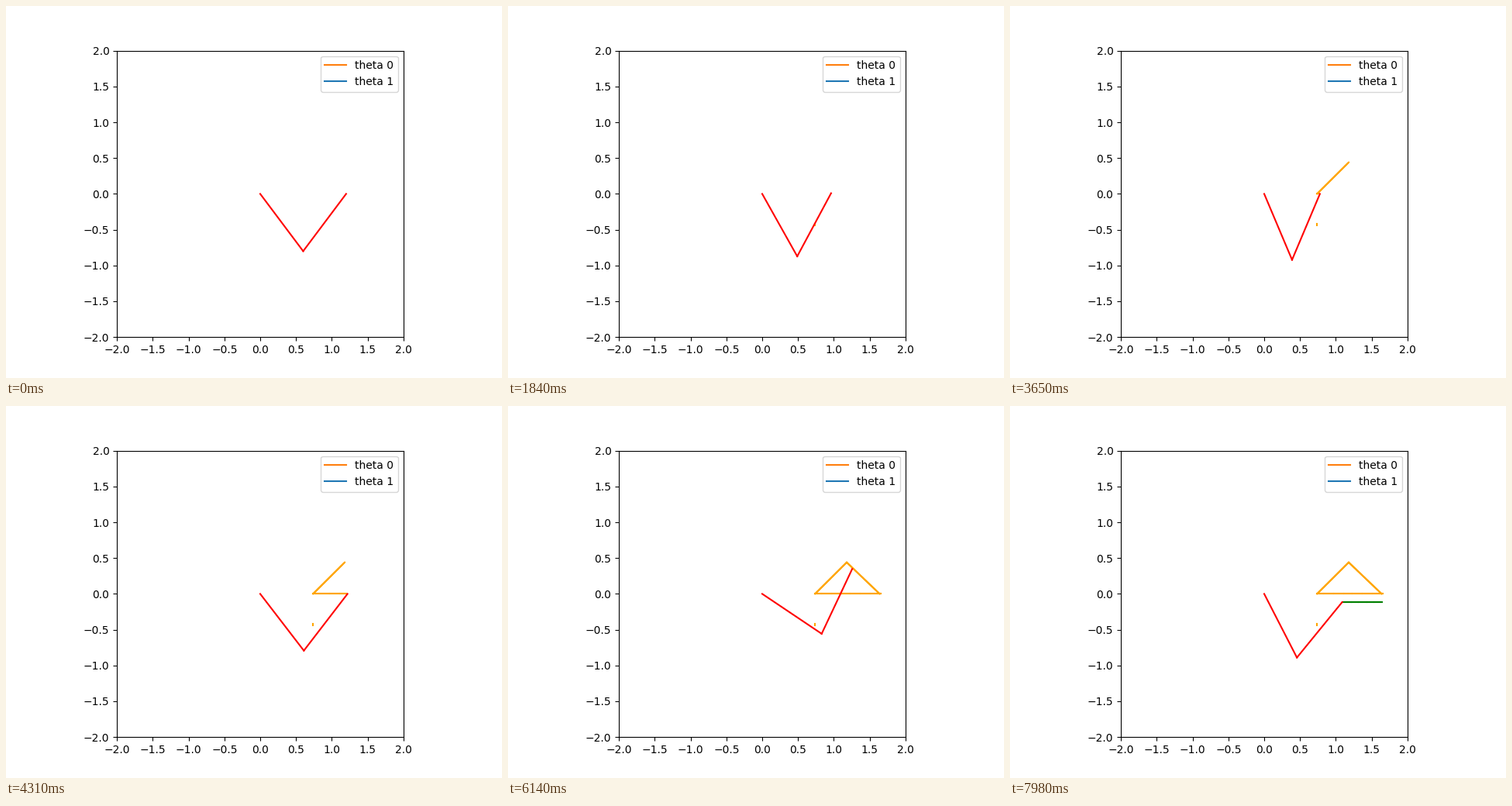
A matplotlib script that plays this animation: 640 px wide and 480 px high, repeating every 8 s.

```python
import numpy as np
import matplotlib.pyplot as plt
from matplotlib.animation import FuncAnimation
from matplotlib.collections import LineCollection

LOOP, INTERVAL, STEP = 8000, 20, 30
START = (1.2, 0.0)
APEX, LEFT, RIGHT = (1.18, 0.44), (0.738, 0.0), (1.64, 0.0)

# target, number of steps, pen colour (None = lifted), pause at the end in ms
LEGS = [
    ((0.735, -0.44), 32, None, 30),
    (APEX, 49, None, 100),
    (LEFT, 31, "orange", 0),
    ((1.66, 0.0), 46, "orange", 0),
    (RIGHT, 1, "orange", 0),
    (APEX, 32, "orange", 0),
    ((1.64, -0.115), 36, None, 100),
    ((0.735, -0.115), 46, "green", 0),
]


def build_path():
    times, points, pens = [0], [START], [None]
    t = 130
    for target, n, pen, pause in LEGS:
        origin = np.array(points[-1])
        for k in range(1, n + 1):
            times.append(t)
            points.append(origin + (np.array(target) - origin) * k / n)
            pens.append(pen)
            t += STEP
        t += pause
    return np.array(times), np.array(points, dtype=float), pens


def elbow(tip):
    """Lower elbow position for two links of length 1."""
    reach = np.hypot(*tip)
    angle = np.arctan2(tip[1], tip[0]) - np.arccos(reach / 2)
    return np.array([np.cos(angle), np.sin(angle)])


TIMES, POINTS, PENS = build_path()
TOUCH_TIME = 1120
TOUCH = [(0.735, -0.44), (0.735, -0.42)]

fig, ax = plt.subplots(figsize=(6.4, 4.8), dpi=100)
ax.set_aspect("equal")
ax.set_xlim(-2, 2)
ax.set_ylim(-2, 2)
ax.plot([], [], color="C1", label="theta 0")
ax.plot([], [], color="C0", label="theta 1")
ax.legend(loc="upper right")

trail = LineCollection([], linewidths=1.5, capstyle="projecting", zorder=2)
ax.add_collection(trail, autolim=False)
upper, = ax.plot([], [], color="red", zorder=2.1)
lower, = ax.plot([], [], color="red", zorder=2.1)


def update(frame):
    t = frame * INTERVAL + INTERVAL / 2
    now = np.searchsorted(TIMES, t, side="right") - 1
    tip = POINTS[now]
    joint = elbow(tip)
    upper.set_data([0, joint[0]], [0, joint[1]])
    lower.set_data([joint[0], tip[0]], [joint[1], tip[1]])

    drawn = [i for i in range(1, now) if PENS[i]]
    segments = [POINTS[i - 1:i + 1] for i in drawn]
    colors = [PENS[i] for i in drawn]
    if t >= TOUCH_TIME:
        segments.append(TOUCH)
        colors.append("orange")
    trail.set_segments(segments)
    trail.set_color(colors)
    return trail, upper, lower


def reset():
    return update(0)


anim = FuncAnimation(fig, update, frames=LOOP // INTERVAL, interval=INTERVAL,
                     init_func=reset, repeat=True, repeat_delay=0)
plt.show()
```
